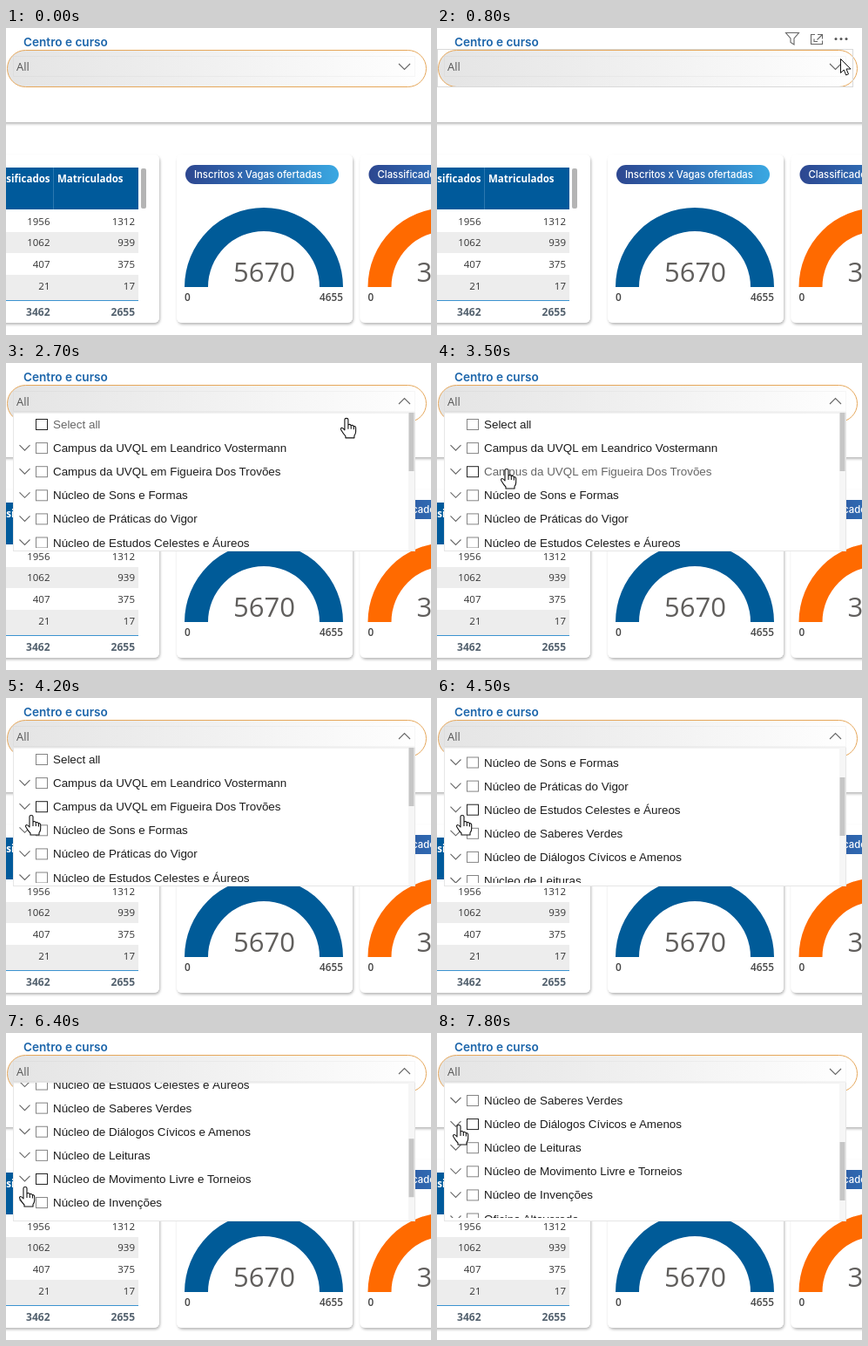
Write an HTML page that moves like this. It is 488x352 px and loops after 8 s.

```html
<!DOCTYPE html>
<html lang="pt">
<head>
<meta charset="utf-8">
<title>Centro e curso</title>
<style>
html, body { margin: 0; width: 488px; height: 352px; overflow: hidden; background: #fff; }
svg { display: block; }
text { white-space: pre; }
.brand { font-family: Inter, sans-serif; font-weight: 500; font-size: 11.3px; fill: #fff; }
.ui { font-family: "Open Sans", "Noto Sans", sans-serif; font-size: 11.5px; fill: #333; }
.bold { font-weight: 700; }
.end { text-anchor: end; }
.mid { text-anchor: middle; }
.item { font-family: "Liberation Sans", Arial, sans-serif; font-size: 13.4px; fill: #1c1c1c; }
.line { fill: none; stroke: #666; stroke-width: 1.1; }
.card { fill: #fff; filter: url(#shadow); }
</style>
</head>
<body>
<svg id="stage" width="488" height="352" viewBox="0 0 488 352">
  <defs>
    <linearGradient id="grey"><stop stop-color="#e4e4e4"/><stop offset=".5" stop-color="#f1f1f1"/><stop offset="1" stop-color="#fff"/></linearGradient>
    <linearGradient id="pill"><stop stop-color="#2d4790"/><stop offset=".4" stop-color="#2f69b1"/><stop offset="1" stop-color="#3aa8e2"/></linearGradient>
    <filter id="shadow" x="-10%" y="-10%" width="120%" height="125%">
      <feDropShadow dx="1" dy="2" stdDeviation="1.5" flood-color="#000" flood-opacity=".28"/>
    </filter>
    <clipPath id="view"><rect x="9" y="57" width="459" height="155"/></clipPath>
  </defs>

  <rect class="card" x="-20" y="-20" width="540" height="128"/>
  <text class="brand" x="20" y="21" style="font-size:13.6px;font-weight:600;fill:#1d66ab">Centro e curso</text>
  <rect x="1.5" y="25.5" width="481" height="42" rx="21" fill="url(#grey)" stroke="#e6a75a"/>
  <rect x="8.5" y="32.5" width="461" height="23" fill="none" stroke="#000" stroke-opacity=".03"/>
  <text class="ui" x="12" y="49" style="font-size:13px;fill:#555">All</text>
  <path id="arrow" class="line" d="M-6.5-3 0 3.5 6.5-3"/>

  <g id="hover">
    <rect x=".5" y="24.5" width="477" height="43" fill="none" stroke="#d9d9d9"/>
    <path class="line" d="M400.5 5.500h15l-5.500 6.500v7l-4-2.500v-4.500z"/>
    <path class="line" d="M434 7.500h-4.500v11h13v-4M437 7.500h5.500v5M442.500 7.500l-6 6M433 12.500v3h4"/>
    <g fill="#555"><circle cx="458" cy="12.500" r="1.500"/><circle cx="464" cy="12.500" r="1.500"/><circle cx="470" cy="12.500" r="1.500"/></g>
  </g>

  <rect class="card" x="-20" y="145" width="196" height="193" rx="6"/>
  <g id="table"></g>
  <g id="gauges"></g>

  <g id="popup">
    <rect x="8.5" y="57" width="461" height="158.500" fill="#fff" stroke="#e6e6e6"/>
    <g clip-path="url(#view)"><g id="list"></g></g>
    <rect x="462" y="57" width="7" height="158" fill="#f6f6f6"/>
    <rect id="thumb" x="462.500" y="57" width="6" height="67" fill="#c6c6c6"/>
  </g>

  <g id="pointer" fill="#fff" stroke="#111" stroke-linejoin="round">
    <path id="arrowCursor" d="M.5.5v16l3.700-3.500 2.500 6 2.800-1.200-2.500-5.800h5z"/>
    <path id="handCursor" d="M-2 2Q-2 .5 0 .5T2 2V8.500Q2 7.500 3.500 7.500T5.300 9.200Q5.400 8.300 6.800 8.500T8.400 10.200Q8.600 9.500 9.600 9.700T10.700 11.500V16Q10.700 18.500 9 20.500V23H-1V21Q-3.500 18.500-5.500 15Q-7.300 12.500-5.800 11.700Q-4.500 11-2 14ZM2 8.500V13M5.300 9.500V13M8.400 10.500V13.500" stroke-width="1.100"/>
  </g>
</svg>
<script>
const LOOP = 8000, STEP = 100, PITCH = 27.1, NOTCH = 77.8;
const $ = id => document.getElementById(id);

function add(parent, tag, attrs, label) {
  const el = document.createElementNS("http://www.w3.org/2000/svg", tag);
  for (const key in attrs) el.setAttribute(key, attrs[key]);
  if (label !== undefined) el.textContent = label;
  parent.appendChild(el);
  return el;
}

function buildTable() {
  const g = $("table");
  const rect = (x, y, width, height, fill, rx = 0) => add(g, "rect", { x, y, width, height, fill, rx });
  rect(0, 160, 152, 48, "#005a9b");
  rect(54, 160, 1, 48, "#2b78b0");
  rect(155, 161, 6, 46, "#b4b4b4", 2);
  rect(0, 234, 152, 24, "#ededed");
  rect(0, 283, 152, 29, "#ededed");
  rect(0, 312, 152, 1, "#3c93d0");
  const head = { y: 177, class: "ui bold", style: "fill:#fff" };
  add(g, "text", { ...head, x: 50.5, class: "ui bold end" }, "sificados");
  add(g, "text", { ...head, x: 59 }, "Matriculados");
  const rows = [[226, 1956, 1312], [250, 1062, 939], [275, 407, 375], [300, 21, 17]];
  for (const [y, a, b] of rows) {
    add(g, "text", { x: 50.5, y, class: "ui end" }, a);
    add(g, "text", { x: 148, y, class: "ui end" }, b);
  }
  const total = { y: 330, class: "ui bold end", style: "font-size:12px;fill:#53616e" };
  add(g, "text", { ...total, x: 50.5 }, 3462);
  add(g, "text", { ...total, x: 148 }, 2655);
}

function buildGauge(x, title, value, max, color) {
  const g = add($("gauges"), "g", { transform: `translate(${x} 0)` });
  add(g, "rect", { x: 0, y: 145, width: 202, height: 193, rx: 6, class: "card" });
  add(g, "rect", { x: 10, y: 157, width: 176, height: 22, rx: 11, fill: "url(#pill)" });
  add(g, "text", { x: 20, y: 172, class: "brand" }, title);
  add(g, "path", { d: "M9 297a91 91 0 0 1 182 0h-27a64 64 0 0 0-128 0z", fill: color });
  add(g, "text", { x: 100.5, y: 291, class: "ui mid", style: "font-size:31px;fill:#605e5c" }, value);
  const scale = { y: 313, style: "font-size:11.800px;font-weight:600;fill:#444" };
  add(g, "text", { ...scale, x: 9, class: "ui" }, 0);
  add(g, "text", { ...scale, x: 191, class: "ui end" }, max);
}

const names = [
  "Select all",
  "Campus da UVQL em Leandrico Vostermann",
  "Campus da UVQL em Figueira Dos Trovões",
  "Núcleo de Sons e Formas",
  "Núcleo de Práticas do Vigor",
  "Núcleo de Estudos Celestes e Áureos",
  "Núcleo de Saberes Verdes",
  "Núcleo de Diálogos Cívicos e Amenos",
  "Núcleo de Leituras",
  "Núcleo de Movimento Livre e Torneios",
  "Núcleo de Invenções",
  "Oficina Altavereda"
];

buildTable();
buildGauge(196, "Inscritos x Vagas ofertadas", 5670, 4655, "#005b98");
buildGauge(406.5, "Classificados x Vagas", 3462, 4655, "#ff6a00");

const items = names.map((name, i) => {
  const g = add($("list"), "g", { transform: `translate(0 ${70 + i * PITCH})` });
  if (i) add(g, "path", { d: "M15.500-3 21.500 3 27.500-3", class: "line" });
  const box = add(g, "rect", { x: 34.5, y: -5.5, width: 13, height: 12, fill: "#fff" });
  const label = add(g, "text", { x: 54, y: 5, class: "item" }, name);
  return { box, label };
});

// time, x, y of the pointer tip
const path = [
  [100, 475, -12], [800, 463, 35], [1000, 463, 36], [1200, 461, 44],
  [1500, 461, 44], [2100, 447, 53], [2500, 447, 53], [3300, 88, 116],
  [3500, 80, 121], [4200, 29, 134], [5000, 29, 134], [5500, 22, 176],
  [5600, 22, 176], [5800, 22, 187], [6000, 22, 187], [6300, 22, 176],
  [6850, 22, 176], [7400, 25, 105]
];

function pointerAt(t) {
  const i = path.findIndex(p => p[0] > t);
  if (i < 0) return path[path.length - 1].slice(1);
  if (i === 0) return path[0].slice(1);
  const [t0, x0, y0] = path[i - 1], [t1, x1, y1] = path[i];
  const k = (t - t0) / (t1 - t0), e = k * k * (3 - 2 * k);
  return [x0 + (x1 - x0) * e, y0 + (y1 - y0) * e];
}

function notch(t, start) {
  const k = Math.min(1, Math.max(0, (t - start) / 300));
  return NOTCH * (1 - (1 - k) ** 2);
}

const show = (id, on) => $(id).setAttribute("visibility", on ? "visible" : "hidden");
const move = (el, x, y, extra = "") => el.setAttribute("transform", `translate(${x} ${y})${extra}`);

function draw(t) {
  const open = t >= 1500;
  const [x, y] = pointerAt(t);
  const scroll = notch(t, 4200) + notch(t, 6200);
  const overList = open && y > 57;

  show("popup", open);
  show("hover", t >= 300 && t < 2700);
  show("pointer", t >= 100);
  show("arrowCursor", t >= 100 && !overList);
  show("handCursor", overList);
  move($("pointer"), x, y);
  move($("arrow"), 457.5, 44, open && t < 7700 ? " scale(1 -1)" : "");
  move($("list"), 0, -scroll);
  $("thumb").setAttribute("y", 57 + scroll * 0.437);

  const hot = overList ? Math.round((y + scroll - 70) / PITCH) : -1;
  items.forEach(({ box, label }, i) => {
    box.setAttribute("stroke", i === hot ? "#222" : "#858585");
    label.style.fill = i === hot && x > 50 ? "#666" : "";
  });
}

const begin = performance.now();
function tick() {
  const t = (performance.now() - begin) % LOOP;
  draw(Math.floor(t / STEP) * STEP);
  requestAnimationFrame(tick);
}
tick();
</script>
</body>
</html>
```
